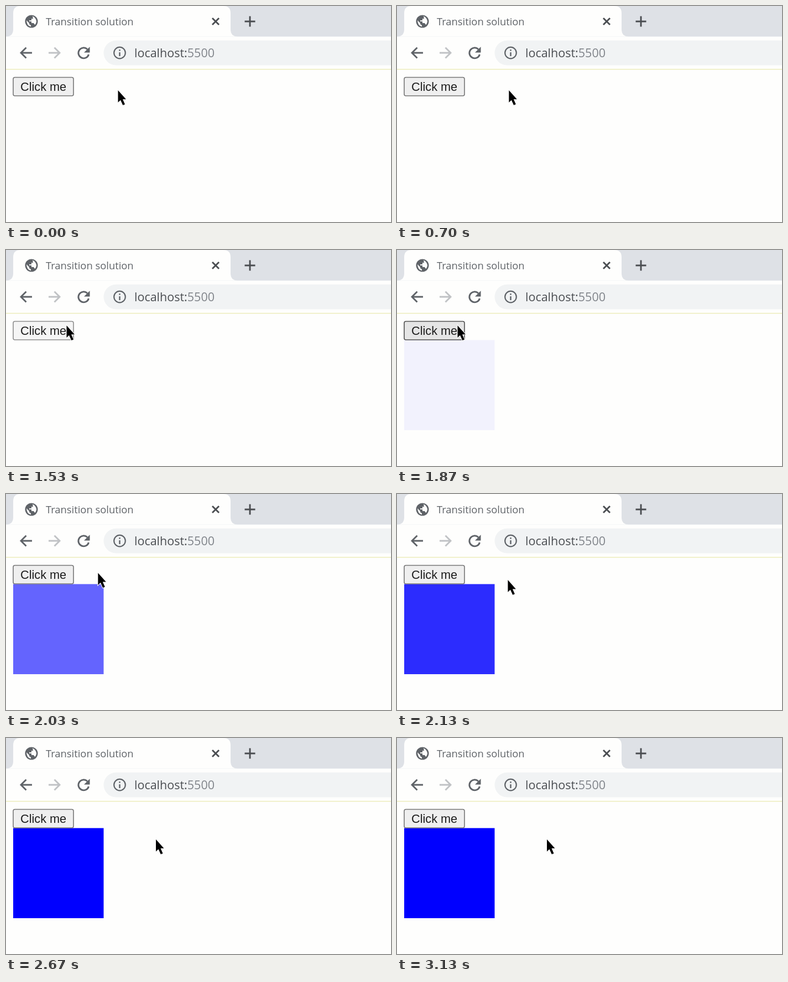
These frames come from a looping animation (696 by 392 pixels, 3190 ms). An HTML page:

```html
<!DOCTYPE html>
<html lang="en">
<meta charset="utf-8">
<title>Transition solution</title>
<style>
  html, body { margin: 0; width: 100%; height: 100%; overflow: hidden; background: #fefefd; }
  svg { display: block; width: 696px; height: 392px; }
  .ui { font-family: "Open Sans", "Noto Sans", sans-serif; }
  .line { fill: none; stroke: #5f6368; stroke-width: 2.9; }
  #button rect { fill: #efefef; stroke: #767676; stroke-width: 1.6; }
  #button.hover rect { fill: #e5e5e5; stroke: #4f4f4f; }
  #button.pressed rect { fill: #f5f5f5; stroke: #8d8d8d; }
</style>
<svg viewBox="0 0 696 392">
  <rect width="696" height="392" fill="#fefefd"/>

  <!-- Tab strip -->
  <rect width="696" height="55.5" fill="#dee1e6"/>
  <path d="M0 55.5Q13 55.5 13 42V13Q13 0 26 0H393Q406 0 406 13V42Q406 55.5 419 55.5Z" fill="#fefefd"/>
  <circle cx="46" cy="28" r="11.5" fill="#5f6368"/>
  <path d="M37 26l5 5v2l3 2v2.500Q37.500 36 37 26ZM48 18.500Q54 21 55 28q-1 5-3 6l-2-3h-4v-3h-4v-2h4v-3h3z" fill="#fefefd"/>
  <text class="ui" x="72" y="34.500" font-size="18.35" fill="#5f6368">Transition solution</text>
  <path class="line" d="M373 22l12 12m0-12l-12 12" style="stroke:#4a4d51"/>
  <path class="line" d="M431.500 28h19m-9.500-9.500v19" style="stroke:#4a4d51"/>

  <!-- Toolbar -->
  <path class="line" d="M47 85H27m9.500-9.500L27 85l9.500 9.500"/>
  <path class="line" d="M77 85h20m-9.500-9.500L97 85l-9.500 9.500" style="stroke:#c0c2c5"/>
  <path class="line" d="M147 78.500A9.500 9.500 0 1 0 149.500 88"/>
  <path d="M151.500 74v10.500H141z" fill="#5f6368"/>
  <path d="M696 62.500H199a22.500 22.500 0 0 0 0 45H696z" fill="#f1f3f4"/>
  <circle class="line" cx="205.500" cy="85" r="10.300" style="stroke-width:2.200"/>
  <path class="line" d="M205.500 79v2.500m0 2.500v7" style="stroke-width:2.400"/>
  <text class="ui" x="232" y="93" font-size="21.5" fill="#4b4e52">localhost:<tspan fill="#80848a">5500</tspan></text>
  <rect y="114" width="696" height="1.700" fill="#efefc4"/>

  <!-- Page -->
  <rect id="square" x="13" y="163.500" width="163.500" height="163.500" fill="#00f"/>
  <g id="button">
    <rect x="13" y="129.500" width="109" height="33.500" rx="3"/>
    <text x="26" y="154" font-size="21.7" font-family="Liberation Sans, Arial, sans-serif" fill="#1c1c1c">Click me</text>
  </g>
  <path id="cursor" d="M.5 1V23L5 18.700L9.300 28L13 26.400L9 17.300H15Z" stroke="#fefefd" stroke-width="2" paint-order="stroke"/>
</svg>
<script>
  const LOOP = 3190, PRESS = 1490, RELEASE = 1790, LEAVE = 1900;
  const FADE_START = 1835, FADE_TIME = 560;
  // Cursor stops: time, x, y
  const path = [
    [0, 202, 152], [700, 202, 152], [870, 172, 144], [1030, 136.5, 135],
    [1200, 124, 134], [1430, 111, 135], [1530, 109, 136], [LEAVE, 109, 136],
    [2030, 165.5, 142], [2300, 257.5, 177], [2620, 270.5, 183], [LOOP, 270.5, 183]
  ];
  const [square, button, cursor] = ["square", "button", "cursor"].map(id => document.getElementById(id));

  function cursorAt(t) {
    const i = path.findIndex(p => p[0] > t);
    const [t0, x0, y0] = path[i - 1], [t1, x1, y1] = path[i];
    const k = (t - t0) / (t1 - t0);
    return [x0 + (x1 - x0) * k, y0 + (y1 - y0) * k];
  }

  // The CSS "ease" curve, cubic-bezier(.25, .1, .25, 1)
  function ease(p) {
    if (p <= 0 || p >= 1) return p <= 0 ? 0 : 1;
    const bezier = (a, b, s) => 3 * a * s * (1 - s) ** 2 + 3 * b * s * s * (1 - s) + s ** 3;
    let lo = 0, hi = 1;
    for (let i = 0; i < 20; i++) {
      const mid = (lo + hi) / 2;
      if (bezier(.25, .25, mid) < p) lo = mid; else hi = mid;
    }
    return bezier(.1, 1, lo);
  }

  function draw() {
    const t = performance.now() % LOOP;
    const [x, y] = cursorAt(t);
    cursor.setAttribute("transform", `translate(${x} ${y})`);
    button.setAttribute("class", t >= PRESS && t < RELEASE ? "pressed" : x < 122 ? "hover" : "");
    square.setAttribute("opacity", ease((t - FADE_START) / FADE_TIME));
    requestAnimationFrame(draw);
  }
  draw();
</script>
</html>
```
